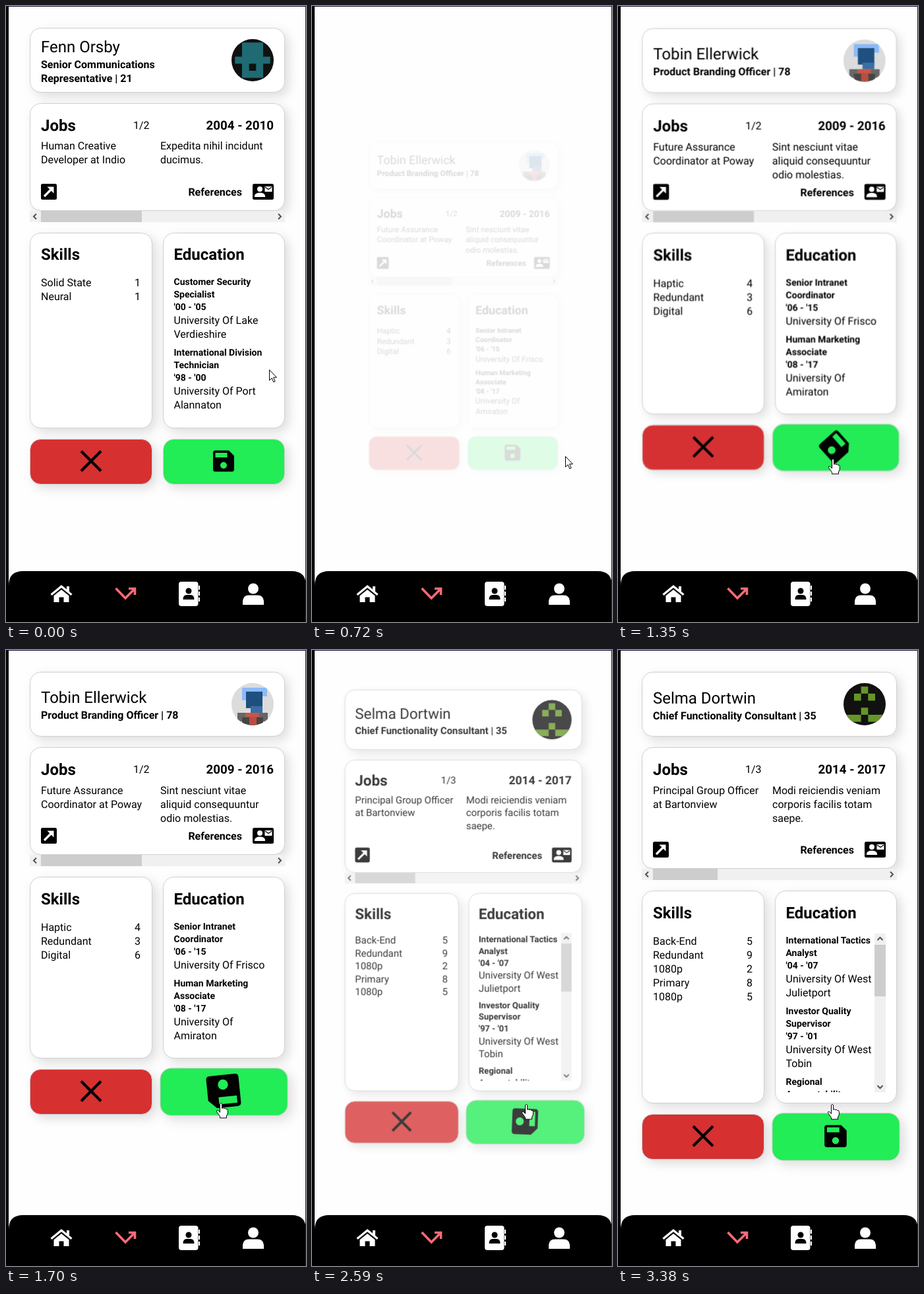
Write an HTML page that moves like this. It is 455x932 px and loops after 3.74 s.

```html
<!DOCTYPE html>
<html lang="en">
<head>
<meta charset="utf-8">
<title>Candidate cards</title>
<style>
  html, body { margin: 0; width: 100%; height: 100%; overflow: hidden; background: #fefefe; }
  svg { display: block; width: 455px; height: 932px; }
  text { font-family: Roboto, Arial, sans-serif; font-size: 16px; fill: #000; text-rendering: geometricPrecision; }
  .b { font-weight: 700; }
  .name { font-size: 24px; }
  .h { font-size: 24px; font-weight: 700; }
  .date { font-size: 18.72px; font-weight: 700; }
  .deg { font-size: 14px; font-weight: 700; }
  .end { text-anchor: end; }
  .card { stroke: #cfcfcf; filter: drop-shadow(6px 6px 8px rgba(0, 0, 0, .13)); }
  .chev { fill: none; stroke: #505050; stroke-width: 2; }
</style>
</head>
<body>
<svg id="stage" viewBox="0 0 455 932">
  <defs>
    <clipPath id="round"><circle cx="374" cy="82" r="32"/></clipPath>
    <g id="save">
      <path fill-rule="evenodd" d="M-12.500-16H8L16-8V12.500Q16 16 12.500 16H-12.500Q-16 16-16 12.500V-12.500Q-16-16-12.500-16ZM-12.500-12.500V-5.500H5.500V-12.500ZM0 1.500A5 5 0 1 0 0 11.500A5 5 0 1 0 0 1.500Z"/>
    </g>
    <g id="open">
      <rect width="24" height="24" rx="2.500"/>
      <path d="M5 19L17 7" stroke="#fff" stroke-width="3.200"/>
      <path d="M9.500 4.500H19.500V14.500Z" fill="#fff"/>
    </g>
    <g id="contact">
      <rect width="32" height="24" rx="2.500"/>
      <g fill="#fff">
        <circle cx="11" cy="8" r="4"/>
        <path d="M3 20V18Q4 13.500 11 13.500T19 18V20Z"/>
        <rect x="18.500" y="4" width="11" height="8"/>
      </g>
      <path d="M19 5L24 8.500L29 5" fill="none" stroke="#000" stroke-width="1.300"/>
    </g>
  </defs>
  <g id="people"></g>
  <path d="M0 0H4V932H0Z"/>
  <path d="M4 932V877Q4 855 26 855H433Q455 855 455 877V932Z"/>
  <path d="M0 .5H455" stroke="#10103c"/>
  <path d="M454.500 0V932" stroke="#23233f"/>
  <g fill="#fff">
    <path d="M84 876L92 882.500V878H96V886L100.500 889.500L98.500 892L84 880.300L69.500 892L67.500 889.500Z"/>
    <path d="M84 883L95.500 892.300V902H87.500V894.500H80.500V902H72.500V892.300Z"/>
    <rect x="262" y="871" width="29.500" height="37" rx="4"/>
    <path d="M292 877h2v6h-2zM292 886h2v6h-2zM292 895h2v6h-2z"/>
    <circle cx="375" cy="881.500" r="8"/>
    <path d="M359 906V900Q360 891.500 368 891.500H382Q390 891.500 391 900V906Z"/>
  </g>
  <circle cx="277" cy="885" r="4.500"/>
  <path d="M268.500 898Q268.500 891 274 891H280Q285.500 891 285.500 898Z"/>
  <path d="M166.500 881L181 896L194 883M186 881.500H195.500V891" fill="none" stroke="#f56b78" stroke-width="3.600"/>
  <g id="cursor" fill="#fff" stroke="#000" stroke-linejoin="round">
    <path id="arrow" d="M.5.5V16.500L4.200 13L6.800 19L9.200 18L6.600 12H11.500Z"/>
    <path id="hand" d="M-1.500 1.500Q0-.8 1.600 1.500V8.500Q3.200 6.800 4.600 8.800Q6.300 7.500 7.600 9.600Q10 8.800 10.400 11.500V16L8.500 20V23H-1.500V20.500L-6.500 13.500Q-7 11-4.500 11.500L-1.500 14.500Z"/>
  </g>
</svg>
<script>
const LOOP = 3740, CX = 229.5, CY = 418.5;
const ENTER = 750, LEAVE = 113, SPIN = 1000;

// Pixel avatars: [colour, x, y, w, h] on the given cell size.
const block = (c, x, y, w = 1, h = 1) =>
  rect(347.3 + x * 10.67, 55.3 + y * 10.67, w * 10.67, h * 10.67, c);
const teal = '#1f6b74', green = '#659528', sky = '#8bbaf8';

const people = [
  {
    name: 'Fenn Orsby', role: ['Senior Communications', 'Representative | 21'], nameY: 70,
    page: '1/2', years: '2004 - 2010', job: ['Human Creative', 'Developer at Indio'],
    note: ['Expedita nihil incidunt', 'ducimus.'],
    skills: [['Solid State', 1], ['Neural', 1]],
    edu: [
      [['Customer Security', 'Specialist', "'00 - '05"], ['University Of Lake', 'Verdieshire']],
      [['International Division', 'Technician', "'98 - '00"], ['University Of Port', 'Alannaton']]
    ],
    dy: 0, jobEnd: 309.5, cardEnd: 638.5, thumb: 153,
    face: () => '#111' , pixels: () => block(teal, 1, 0, 3, 5) + block(teal, 0, 2, 5) + block('#111', 2, 3),
    enter: -2000, leave: 540, hover: 270
  },
  {
    name: 'Tobin Ellerwick', role: ['Product Branding Officer | 78'], nameY: 80,
    page: '1/2', years: '2009 - 2016', job: ['Future Assurance', 'Coordinator at Poway'],
    note: ['Sint nesciunt vitae', 'aliquid consequuntur', 'odio molestias.'],
    skills: [['Haptic', 4], ['Redundant', 3], ['Digital', 6]],
    edu: [
      [['Senior Intranet', 'Coordinator', "'06 - '15"], ['University Of Frisco']],
      [['Human Marketing', 'Associate', "'08 - '17"], ['University Of', 'Amiraton']]
    ],
    dy: 1, jobEnd: 309.5, cardEnd: 617.5, thumb: 153,
    face: () => '#dcdcdc',
    pixels: () => rect(358, 57, 38, 13, sky) + rect(358, 63, 9, 13, sky) +
      rect(364, 63, 25, 25, '#1f4f7f') + rect(371, 85, 18, 10, '#3a6ea5') +
      rect(351, 95, 46, 13, '#666') + rect(358, 102, 32, 12, '#444') +
      rect(363, 95, 21, 6, '#cc5545') + rect(369, 101, 11, 13, '#b94d40'),
    enter: 653, leave: 2060, hover: 1217
  },
  {
    name: 'Selma Dortwin', role: ['Chief Functionality Consultant | 35'], nameY: 81,
    page: '1/3', years: '2014 - 2017', job: ['Principal Group Officer', 'at Bartonview'],
    note: ['Modi reiciendis veniam', 'corporis facilis totam', 'saepe.'],
    skills: [['Back-End', 5], ['Redundant', 9], ['1080p', 2], ['Primary', 8], ['1080p', 5]],
    edu: [
      [['International Tactics', 'Analyst', "'04 - '07"], ['University Of West', 'Julietport']],
      [['Investor Quality', 'Supervisor', "'97 - '01"], ['University Of West', 'Tobin']],
      [['Regional', 'Accountability'], []]
    ],
    dy: 1, jobEnd: 330.5, cardEnd: 685.5, thumb: 98, scroll: true,
    face: () => '#111',
    pixels: () => block(green, 2, 0) + block(green, 1, 1) + block(green, 3, 1) + block(green, 2, 3) +
      block(green, -1, 4, 3) + block(green, 3, 4, 3),
    enter: 2173, leave: 9999, hover: 2335
  }
];

function rect(x, y, w, h, fill, extra = '') {
  return `<rect x="${x}" y="${y}" width="${w}" height="${h}" fill="${fill}" ${extra}/>`;
}
function card(x, y, x2, y2, fill = '#fff') {
  return rect(x, y, x2 - x, y2 - y, fill, 'class="card" rx="16"');
}
function text(x, y, s, cls = '') {
  return `<text x="${x}" y="${y}" class="${cls}">${s}</text>`;
}
function lines(x, y, list, cls, step = 21) {
  return list.map((s, i) => text(x, y + i * step, s, cls)).join('');
}
function chevron(x, y, turn) {
  return `<path class="chev" d="M-4 2L0-2L4 2" transform="translate(${x} ${y}) rotate(${turn})"/>`;
}

function education(p, y) {
  let out = '';
  for (const [degree, school] of p.edu) {
    out += lines(254.5, y, degree, 'deg', 19);
    y += degree.length * 19 + 2;
    out += lines(254.5, y, school);
    y += school.length * 21 + 6;
  }
  return out;
}

function build(p, i) {
  const j = p.jobEnd, top = j + 34, end = p.cardEnd, by = end + 17, cy = by + 33;
  const dy = p.dy, iy = j - 40.5;
  const clip = `<clipPath id="clip${i}">${rect(239, top, 183, end - 16.5 - top, '#000')}</clipPath>`;
  let out = clip + card(36.5, 33.5, 422.5, 130.5) +
    text(53, p.nameY, p.name, 'name') + lines(53, p.nameY + 24, p.role, 'b') +
    `<circle cx="374" cy="82" r="32" fill="${p.face()}"/><g clip-path="url(#round)">${p.pixels()}</g>`;

  out += card(36.5, 147.5, 422.5, j) +
    text(53, 189, 'Jobs', 'h') + text(193, 186, p.page) + text(406, 187, p.years, 'date end') +
    lines(53, 217 + dy, p.job) + lines(234, 217 + dy, p.note) +
    text(358, iy + 18, 'References', 'b end') +
    `<use href="#open" x="53" y="${iy}"/><use href="#contact" x="374" y="${iy}"/>` +
    rect(36, j + .5, 387, 17, '#f0f0f0') + rect(53, j + .5, p.thumb, 17, '#cdcdcd') +
    chevron(44, j + 9, -90) + chevron(415, j + 9, 90);

  out += card(36.5, top, 221.5, end) + card(238.5, top, 422.5, end) +
    text(53, top + 40.5 + dy, 'Skills', 'h') + text(254.5, top + 40.5 + dy, 'Education', 'h');
  p.skills.forEach(([label, n], k) => {
    const y = top + 80.5 + dy + k * 21;
    out += text(53, y, label) + text(204, y, n, 'end');
  });
  out += `<g clip-path="url(#clip${i})">${education(p, top + 78.5 + dy)}</g>`;
  if (p.scroll) {
    out += rect(389, 429, 17, 240, '#f0f0f0') + rect(389, 446, 17, 78, '#cdcdcd') +
      chevron(397.5, 437, 0) + chevron(397.5, 661, 180);
  }

  out += card(36.5, by, 221.5, by + 68, '#d63031') +
    `<path d="M114 ${cy - 15}l30 30m0-30l-30 30" stroke="#000" stroke-width="4.2"/>` +
    `<g class="btn">${card(238.5, by, 422.5, by + 68, '#22ec56')}<g class="icon"><use href="#save"/></g></g>`;

  const g = document.createElementNS('http://www.w3.org/2000/svg', 'g');
  g.innerHTML = out;
  document.getElementById('people').append(g);
  return { ...p, g, cy, btn: g.querySelector('.btn'), icon: g.querySelector('.icon') };
}

const views = people.map(build);
const clamp = v => Math.min(1, Math.max(0, v));

function drawPerson(v, t) {
  const visible = t >= v.enter && t < v.leave + LEAVE;
  v.g.style.display = visible ? '' : 'none';
  if (!visible) return;

  const inT = t - v.enter;
  const out = clamp((t - v.leave) / LEAVE);
  const shown = Math.sin(clamp(inT / ENTER) * Math.PI / 2) * (1 - out);
  const s = .7 + .3 * shown;
  const shift = 104 * (1 - clamp(inT / 410)) ** 2 - 250 * out;
  v.g.setAttribute('opacity', shown);
  v.g.setAttribute('transform', `translate(${CX * (1 - s)} ${CY * (1 - s) + shift}) scale(${s})`);

  const grow = 1 + .05 * clamp((t - v.hover) / 150);
  const spin = clamp((t - v.hover) / SPIN);
  const swell = 1 + .48 * (1 - Math.abs(2 * spin - 1));
  const bx = 330.5, by = v.cy + 1;
  v.btn.setAttribute('transform', `translate(${bx} ${by}) scale(${grow}) translate(${-bx} ${-by})`);
  v.icon.setAttribute('transform', `translate(330 ${v.cy}) rotate(${360 * spin}) scale(${swell})`);
}

// Pointer stops: time, x, y
const stops = [
  [0, 399, 550], [90, 398, 565], [360, 385, 678], [720, 384, 681], [1050, 383, 688],
  [1090, 382, 688], [1260, 326, 685], [1900, 326, 685], [2200, 325, 687], [LOOP, 325, 687]
];
const cursor = document.getElementById('cursor');
const arrow = document.getElementById('arrow');
const hand = document.getElementById('hand');

function drawCursor(t) {
  const k = stops.findIndex(s => s[0] > t);
  const [t0, x0, y0] = stops[k - 1], [t1, x1, y1] = stops[k];
  const f = (t - t0) / (t1 - t0), e = f * f * (3 - 2 * f);
  cursor.setAttribute('transform', `translate(${x0 + (x1 - x0) * e} ${y0 + (y1 - y0) * e})`);
  const over = views.some(v => t >= v.hover && t < v.leave);
  arrow.style.display = over ? 'none' : '';
  hand.style.display = over ? '' : 'none';
}

function frame() {
  const t = performance.now() % LOOP;
  views.forEach(v => drawPerson(v, t));
  drawCursor(t);
  requestAnimationFrame(frame);
}
frame();
</script>
</body>
</html>
```
